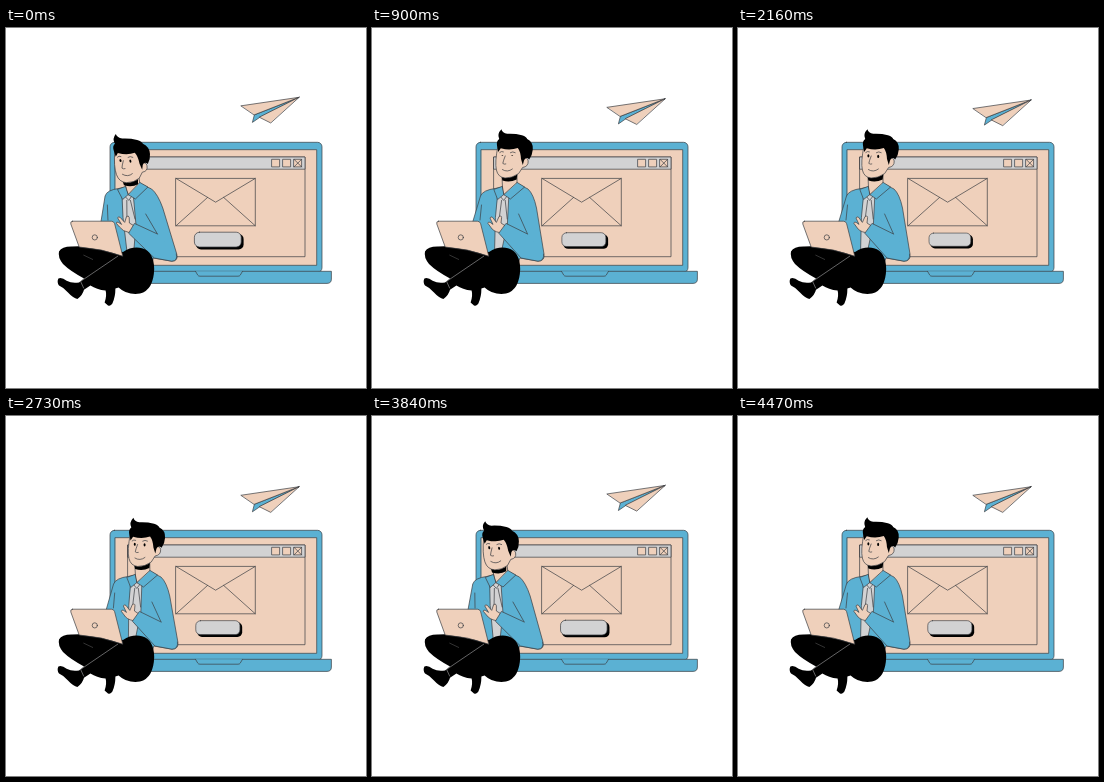
Write an HTML page that moves like this. It is 360 by 360 pixels and loops after 4.5 s.

```html
<!DOCTYPE html>
<html lang="en">
<head>
<meta charset="utf-8">
<title>Mail</title>
<style>
  @property --bob { syntax: "<number>"; inherits: true; initial-value: 0; }
  @property --lean { syntax: "<number>"; inherits: true; initial-value: 0; }
  @property --wave { syntax: "<number>"; inherits: true; initial-value: 0; }
  @property --blink { syntax: "<number>"; inherits: true; initial-value: 0; }

  html, body { margin: 0; width: 100%; height: 100%; overflow: hidden; background: #fff; }
  svg {
    display: block; width: 100vw; height: 100vh;
    animation: 4.5s cubic-bezier(.333, 0, .667, 1) infinite;
    animation-name: bob, lean, wave, blink;
  }

  .line { stroke: #3c3e42; stroke-width: .7; stroke-linejoin: round; stroke-linecap: round; }
  .none { fill: none; }
  .blue { fill: #5bb1d3; }
  .skin { fill: #efd0bb; }
  .gray { fill: #d2d2d3; }

  .plane { transform: translateY(calc(var(--bob) * 3px)); }
  .button { transform: scale(calc(1 - var(--bob) * .12)); transform-origin: 212.8px 212.4px; }
  .torso { transform: skewX(calc(var(--lean) * 8deg)); transform-origin: 125px 235px; }
  .head { transform: translate(calc(var(--lean) * -1.5px), calc(var(--lean) * 4.7px)); }
  .arm { transform: rotate(calc(var(--wave) * -10deg)); transform-origin: 165px 222px; }
  .eyes { transform: scaleY(calc(1 - var(--blink) * .8)); transform-origin: 136px 127.5px; }

  /* quarter sine waves: the loop cuts off at the half-way point */
  @keyframes bob {
    0%, 80% { --bob: 0; animation-timing-function: cubic-bezier(.364, 0, .636, .476); }
    20%, 60% { --bob: .5; animation-timing-function: cubic-bezier(.364, .524, .636, 1); }
    40% { --bob: 1; animation-timing-function: cubic-bezier(.364, 0, .636, .476); }
    100% { --bob: .5; }
  }
  @keyframes lean {
    0%, 80% { --lean: 1; }
    20%, 56%, 100% { --lean: 0; }
  }
  @keyframes wave {
    0%, 21%, 46%, 100% { --wave: 0; }
    33.3% { --wave: 1; }
  }
  @keyframes blink {
    0%, 19.4%, 22%, 100% { --blink: 0; }
    20%, 20.8% { --blink: 1; }
  }
</style>
</head>
<body>
<svg viewBox="0 0 360 360">
  <!-- big laptop -->
  <g class="line">
    <rect class="blue" x="104" y="114.3" width="212" height="130" rx="4.5"/>
    <rect class="skin" x="109.3" y="121.7" width="201.4" height="115.6"/>
    <path class="blue" d="M104 243.3H325.4V251Q325.4 255.4 321 255.4H104Z"/>
    <path class="blue" d="M189.5 243.3L191.8 247.2Q192.4 248.2 194 248.2H232Q233.6 248.2 234.2 247.2L236.5 243.3"/>
    <rect class="none" x="122" y="129" width="177" height="99.7"/>
    <rect class="gray" x="122" y="129" width="177" height="12.2"/>
    <g class="skin">
      <rect x="266" y="131.3" width="7.6" height="7.6"/>
      <rect x="277" y="131.3" width="7.6" height="7.6"/>
      <rect x="288" y="131.3" width="7.6" height="7.6"/>
    </g>
    <path d="M288 131.3L295.6 138.9M295.6 131.3L288 138.9"/>
    <rect class="skin" x="170" y="150.4" width="79.3" height="47.4"/>
    <path class="none" d="M170 150.4L209.6 174.2L249.3 150.4M170 197.8L201.6 169.4M249.3 197.8L217.6 169.4"/>
  </g>

  <g class="button">
    <rect x="190" y="206" width="47.6" height="15.4" rx="5"/>
    <rect class="gray line" x="188.4" y="204.2" width="46.8" height="14.8" rx="5"/>
  </g>

  <g class="plane line">
    <path class="blue" d="M293 69.3L248.4 86.8L246.4 94.4L253.4 89.6Z"/>
    <path class="skin" d="M235.2 77.8L293 69.3L248.4 86.8Z"/>
    <path class="skin" d="M293 69.3L253.2 89.2L264.4 94.8Z"/>
  </g>

  <g class="torso">
    <!-- jacket -->
    <path class="blue line" d="M123 160.5Q111 162 108.5 168L100.4 195L108 238H145L148 230L166 233.2Q173 233 172 226L164.5 180Q161.5 166 156 161L146 156Z"/>
    <path class="gray line" d="M126 166L137 164L135.4 196L128 230H122.4L123.4 190Z"/>
    <path class="none line" d="M129.6 172.4L127 192M133.2 172.4L135.2 191M127.6 167.5L131.6 172.4L135.6 167.5M146.6 186L155.5 206M109.5 177L108 192"/>
    <!-- neck and collar -->
    <path class="skin line" d="M130 148L130.6 162L132 167L145 157V147Z"/>
    <path class="blue line" d="M130 158.5L121.8 161.4L125.6 171.5L131.5 166.8Z"/>
    <path class="blue line" d="M145.4 154.6L152.6 159L138.4 171L132 166.8Z"/>

    <g class="head">
      <path d="M129.4 147.5L145.6 144.5L144.6 151.5Q138 155 130.4 152.6Z"/>
      <path class="skin line" d="M126 118Q122.6 134 124.4 142Q126 149.3 133 150Q140.4 150.2 146.6 145.6L150.6 139.5Q156.5 138.6 156.2 133Q155.6 129 151 130.5L148 117Z"/>
      <path d="M129.4 101.3Q130.4 105 135.2 105.8Q143 105.4 150 107.2Q154.6 108.6 155.2 111Q161.4 114 160.8 121.4Q160.4 127 157.2 131.4Q154 128.2 152 132.4L150.8 137L149 131Q148.6 123.6 145.8 120Q138 122.8 128.8 120.3L126.2 124L125 117.6Q124.2 113.4 127.2 111Q124.8 106 129.4 101.3Z"/>
      <path class="none line" d="M127.8 124.4Q129.4 122.8 131.4 123.8M138.4 124.6Q140.6 123 143.2 124.6M133.2 128Q131.2 133 130.8 135.4Q132 136.6 133.8 136M130.4 141.6Q135.4 144.8 140.4 141"/>
      <g class="eyes">
        <ellipse cx="130.4" cy="127.8" rx="1" ry="1.6"/>
        <ellipse cx="140.2" cy="128.4" rx="1" ry="1.6"/>
      </g>
    </g>

    <g class="arm line">
      <path class="skin" d="M127.4 204.6Q121 203.4 118.6 199L115.8 195.2Q116.2 193.4 118.2 194.4L121 196.4L118 190Q118.6 188 120.6 189.4L124.4 194.4L127 188.6Q129.4 187 129.6 189.6L129 195L134.4 198.6Z"/>
      <path class="blue" stroke="none" d="M134 195.4L126.8 205.2L149 230L166 233.2Q172.4 233 171.6 226L155.5 206Z"/>
      <path class="none" d="M155.5 206L134 195.4L126.8 205.2L149 230L166 233.2Q172.4 233 171.6 226"/>
    </g>
  </g>

  <!-- legs -->
  <path d="M66 218.6Q84 217.4 101 222L117 224Q126 218 136 220.2Q148 223.6 148.2 241Q147.6 262 134 265.6Q121 267.4 112.6 259.4L109.4 260.6Q109.4 269 106.4 275.6Q104.6 278.6 102 277.4L98.6 274.6Q101 267.6 99.6 262.6Q90.6 261.4 84.4 257.4L78 261.8Q76.6 267.4 71.4 271Q67.4 270.6 62 264.6Q57.4 259.4 53 257.6Q50.6 254 52.4 250.4Q56 249 60.6 252.8Q66 255.6 73 254.4L78 250.4Q64 243 57 236Q51.6 229.4 53 223.6Q56 218.4 66 218.6Z"/>
  <path d="M112 228L74.6 253.4L77.8 260.4" fill="none" stroke="#a8a8aa" stroke-width=".6"/>
  <path d="M77.4 227L87 231.6" stroke="#666" stroke-width=".5"/>

  <!-- small laptop -->
  <path class="skin line" d="M66.6 193.2H105.4Q107.8 193.2 108.6 195.6L116.8 228.2Q96 220.6 73.2 219L64.8 196Q64 193.2 66.6 193.2Z"/>
  <circle class="none line" cx="88.8" cy="209.4" r="2.6"/>
</svg>
</body>
</html>
```
